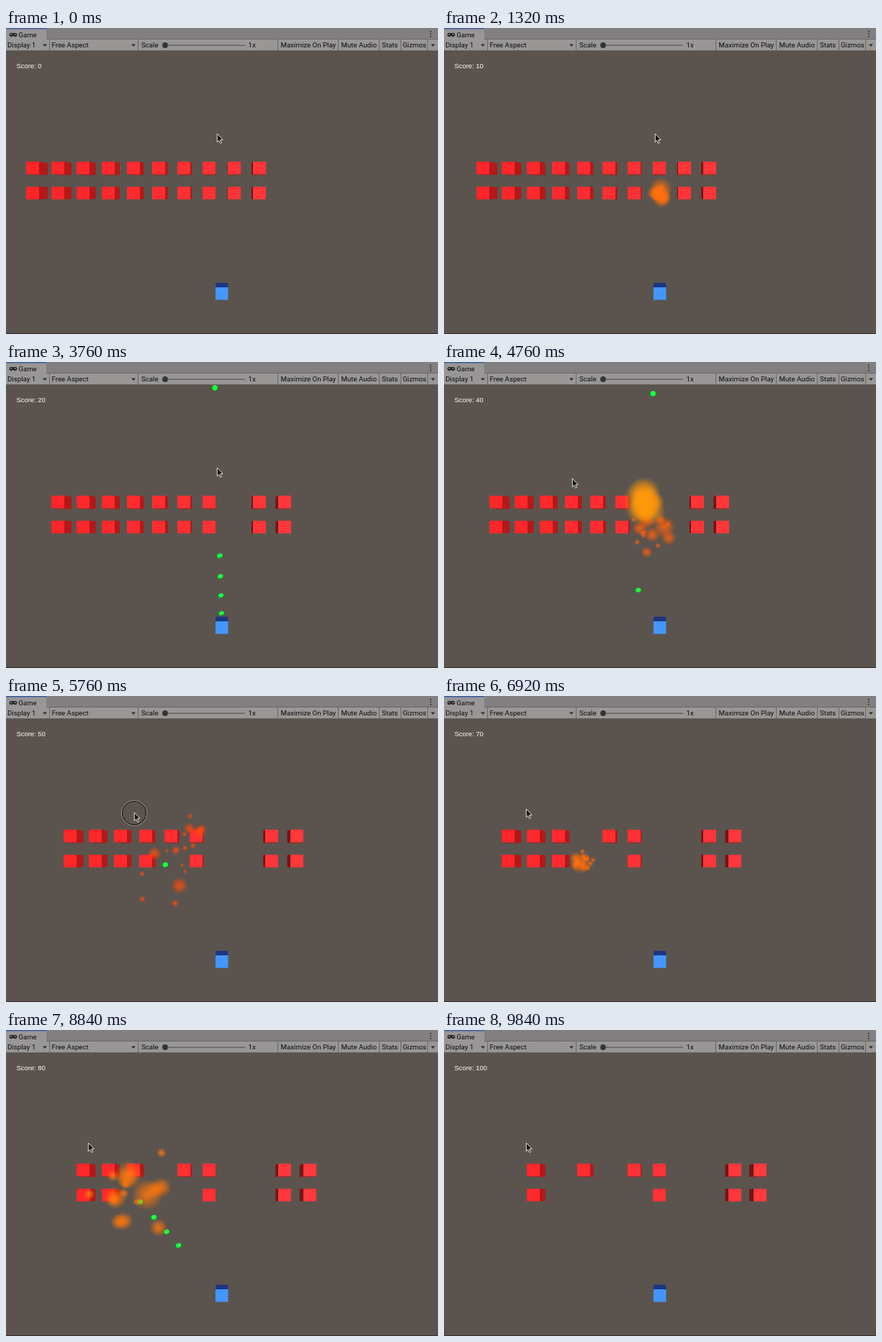
These frames come from a looping animation (600 by 426 pixels, 9880 ms). An HTML page with a canvas:

```html
<!DOCTYPE html>
<html>
<head>
<meta charset="utf-8">
<style>
html, body { margin: 0; width: 100%; height: 100%; overflow: hidden; background: #5b544e; }
canvas { display: block; }
</style>
</head>
<body>
<canvas id="stage" width="600" height="426"></canvas>
<script>
const ctx = document.getElementById('stage').getContext('2d');
const LOOP = 9880, FRAME = 40, BURST_LIFE = 735;
const GUN = { x: 299.5, y: 369 }, EYE = { x: 300, y: 229 };

// Where the cursor rests: time, x, y
const path = [[0, 293, 147], [3770, 293, 147], [4450, 178, 162],
  [5900, 178, 162], [6400, 114, 157], [LOOP, 114, 157]];

// Volleys: start time, number of shots, gap
const volleys = [[700], [1804, 2, 131], [2650], [3329, 4, 113], [3880, 2, 80],
  [4488], [5131], [6150], [7513], [8156, 4, 94]];

const stepsAt = t => Math.floor((t + 940) / 2000);
const enemyX = (col, t) => Math.floor(28 + 35 * col + 17.5 * stepsAt(t));
const enemyY = row => 186 + 35 * row;

function seeded(seed) {
  return () => (seed = (seed * 16807) % 2147483647) / 2147483647;
}

function cursorAt(t) {
  const i = Math.max(1, path.findIndex(p => p[0] >= t));
  const [t0, x0, y0] = path[i - 1], [t1, x1, y1] = path[i];
  const u = (t - t0) / (t1 - t0), ease = u * u * (3 - 2 * u);
  return { x: x0 + (x1 - x0) * ease, y: y0 + (y1 - y0) * ease };
}

function makeBullet(fire) {
  const aim = cursorAt(fire);
  return { fire, angle: Math.atan2(aim.y - GUN.y, aim.x - GUN.x), end: Infinity };
}

// Shots fly towards the camera, so they speed up on screen
function bulletAt(b, t) {
  const age = t - b.fire, s = 200 * age / (1000 - 0.3 * age);
  return { x: GUN.x + Math.cos(b.angle) * s, y: GUN.y + Math.sin(b.angle) * s };
}

function makeSparks(seed, hot) {
  const random = seeded(7919 * (seed + 3));
  return Array.from({ length: 16 }, () => ({
    angle: random() * 2 * Math.PI,
    speed: 15 + 95 * random(),
    radius: hot ? 5 + 17 * random() ** 2 : 3 + 10 * random() ** 3
  }));
}

const bullets = volleys.flatMap(([start, count = 1, gap = 0]) =>
  Array.from({ length: count }, (_, i) => makeBullet(start + i * gap)));
const enemies = Array.from({ length: 20 }, (_, i) =>
  ({ col: i % 10, row: Math.floor(i / 10), end: Infinity }));
const bursts = [];

function hits(p, enemy, t) {
  return Math.abs(p.x - enemyX(enemy.col, t) - 9) < 11.5 && Math.abs(p.y - enemyY(enemy.row) - 9) < 11.5;
}

// Play the round once to learn who is hit and when
for (let t = 0; t < LOOP; t += 5) {
  for (const b of bullets) {
    if (t < b.fire || t >= b.end || t > b.fire + 1500) continue;
    const p = bulletAt(b, t);
    const enemy = enemies.find(e => t < e.end && hits(p, e, t));
    if (!enemy) continue;
    b.end = enemy.end = t;
    const hot = bursts.length % 2;
    bursts.push({ start: t, x: enemyX(enemy.col, t) + 9, y: enemyY(enemy.row) + 9,
      hot, sparks: makeSparks(bursts.length, hot) });
  }
}

function polygon(points, fill) {
  ctx.fillStyle = fill;
  ctx.beginPath();
  points.forEach(p => ctx.lineTo(p[0], p[1]));
  ctx.closePath();
  ctx.fill();
}

function rect(x, y, w, h, fill) {
  ctx.fillStyle = fill;
  ctx.fillRect(x, y, w, h);
}

function ellipse(x, y, rx, ry, fill, tilt = 0) {
  ctx.fillStyle = fill;
  ctx.beginPath();
  ctx.ellipse(x, y, rx, ry, tilt, 0, 7);
  ctx.fill();
}

function cube(x, y, w, h, colors) {
  const back = ([px, py]) => [px + (EYE.x - px) * 0.047, py + (EYE.y - py) * 0.047];
  const side = (a, b, fill) => polygon([a, b, back(b), back(a)], fill);
  const tl = [x, y], tr = [x + w, y], bl = [x, y + h], br = [x + w, y + h];
  if (y + h < EYE.y) side(bl, br, colors.bottom);
  if (y > EYE.y) side(tl, tr, colors.top);
  if (x + w < EYE.x) side(tr, br, colors.right);
  if (x > EYE.x) side(tl, bl, colors.left);
  rect(x, y, w, h, colors.front);
}

function drawEnemy({ col, row, end }, t) {
  if (t >= end) return;
  const x = enemyX(col, t), tint = 34 + x / 18;
  cube(x, enemyY(row), 18, 17.5, { front: `rgb(255,${tint},${tint + 3})`,
    right: '#b21918', left: '#741517', bottom: '#b01c1d' });
}

function drawBurst({ start, x, y, hot, sparks }, t) {
  const age = t - start, life = 1 - age / BURST_LIFE;
  if (age < 0 || life <= 0) return;
  const size = Math.min(1.25, Math.sqrt(life / 0.1));
  const hue = (hot ? 25 : 14) + 12 * life;
  for (const { angle, speed, radius } of sparks) {
    const reach = speed * age / 1000, r = radius * size;
    const sx = x + Math.cos(angle) * reach, sy = y + Math.sin(angle) * reach;
    const glow = ctx.createRadialGradient(sx, sy, 0, sx, sy, r);
    glow.addColorStop(0, `hsla(${hue},100%,53%,.85)`);
    glow.addColorStop(0.45, `hsla(${hue},100%,52%,.55)`);
    glow.addColorStop(1, `hsla(${hue},100%,50%,0)`);
    ellipse(sx, sy, r, r, glow);
  }
}

function drawBullet(b, t) {
  if (t < b.fire || t >= b.end || t > b.fire + 1500) return;
  const { x, y } = bulletAt(b, t);
  const ry = 3.1 + (t - b.fire) / 1000;
  ellipse(x, y, 4.2, ry, '#12992a', -0.35);
  ellipse(x + 0.4, y - 0.5, 3.6, ry - 0.6, '#1dff42', -0.35);
}

function drawCursor(t) {
  const { x, y } = cursorAt(t);
  if (t >= 5600 && t <= 5880) {
    const r = 16.5 + (5760 - t) * 0.12;
    for (const [extra, color] of [[0.7, '#b5b2b0'], [0, '#141414']]) {
      ctx.strokeStyle = color;
      ctx.lineWidth = 1.2;
      ctx.beginPath();
      ctx.arc(x, y + 1, r + extra, 0, 7);
      ctx.stroke();
    }
  }
  ctx.save();
  ctx.translate(x - 0.2, y + 0.3);
  polygon([[0.5, 0], [0.5, 11.5], [3, 9.2], [4.8, 13.2], [6.6, 12.4], [4.9, 8.5], [8.3, 8.2]], '#111');
  ctx.strokeStyle = '#f4f4f4';
  ctx.lineWidth = 0.9;
  ctx.stroke();
  ctx.restore();
}

function label(text, x, y = 27.3, size = 9.7) {
  ctx.font = `${size}px Roboto, Arial, sans-serif`;
  ctx.fillStyle = '#0c0c0c';
  ctx.fillText(text, x, y);
}

function drawToolbar() {
  rect(0, 0, 600, 16, '#817f7f');
  rect(0, 0, 56, 16, '#999696');
  rect(0, 0, 56, 1.5, '#3b5f9f');
  rect(0, 16, 600, 16, '#999696');
  rect(56, 15, 544, 1, '#686666');
  rect(0, 31, 600, 1, '#65615e');
  for (const x of [60, 183, 377, 461, 518, 548, 585]) rect(x, 16, 1, 15, '#686666');
  for (const x of [54, 177, 593]) polygon([[x - 3, 22.5], [x + 3, 22.5], [x, 26]], '#303030');
  for (const y of [4, 7.5, 11]) rect(589, y, 1.6, 1.6, '#242424');

  rect(7, 7, 6, 4, '#282828');
  for (const x of [7.3, 12.7]) {
    ellipse(x, 9.5, 2.6, 2.8, '#282828');
    ellipse(x, 9, 0.9, 0.9, '#999696');
  }

  label('Game', 17.5, 12.8, 9.5);
  label('Display 1', 2);
  label('Free Aspect', 63.5);
  label('Scale', 188);
  label('1x', 336.5);
  label('Maximize On Play', 381.5);
  label('Mute Audio', 465.5);
  label('Stats', 522);
  label('Gizmos', 551);

  rect(225, 23.5, 107, 1.2, '#575555');
  ellipse(221, 24, 3.9, 3.9, '#343434');
}

function drawScore(t) {
  const score = 10 * bursts.filter(b => t >= b.start).length;
  ctx.font = '9.4px "Liberation Sans", Arial, sans-serif';
  ctx.fillStyle = '#fff';
  ctx.fillText(`Score: ${score}`, 14.5, 56);
}

function draw(t) {
  rect(0, 0, 600, 426, '#5b544e');
  rect(0, 425, 600, 1, '#38272f');
  enemies.forEach(e => drawEnemy(e, t));
  bullets.forEach(b => drawBullet(b, t));
  bursts.forEach(b => drawBurst(b, t));
  cube(291, 361, 17.5, 17.5, { front: '#4496ff', top: '#1a3583' });
  drawScore(t);
  drawToolbar();
  drawCursor(t);
}

const start = performance.now();
function tick() {
  const t = (performance.now() - start) % LOOP;
  draw(Math.floor(t / FRAME) * FRAME);
  requestAnimationFrame(tick);
}
tick();
</script>
</body>
</html>
```
